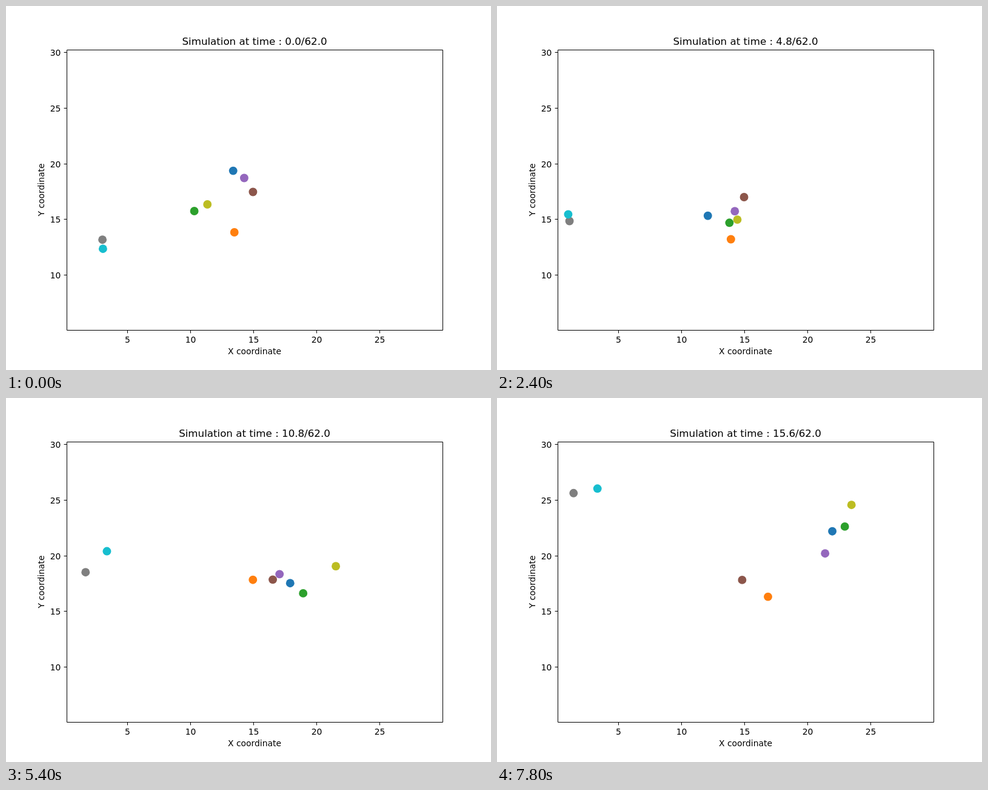
These frames come from a looping animation (800x600 px, 8000 ms). An HTML page:

```html
<!DOCTYPE html>
<html lang="en">
<head>
<meta charset="utf-8">
<title>Simulation</title>
<style>
  html, body { margin: 0; width: 100%; height: 100%; overflow: hidden; background: #fff; }
  svg { display: block; width: 100vw; height: 100vh; }
  text { font: 13.89px "DejaVu Sans", sans-serif; text-anchor: middle; }
  .title { font-size: 16.67px; }
  .end { text-anchor: end; }
  path { fill: none; stroke: #000; }
</style>
</head>
<body>
<svg id="stage" viewBox="0 0 800 600">
  <g id="dots"></g>
  <path d="M100.5 72.5H720.5V534.5H100.5Z"/>
  <g id="axes"></g>
  <text x="410" y="574">X coordinate</text>
  <text transform="translate(63 303) rotate(-90)">Y coordinate</text>
  <text id="title" class="title" x="410" y="64"></text>
</svg>
<script>
const LOOP = 8000, STEP = 200;

// Each walker drifts from one point to another while swaying:
// sway holds the x and y amplitudes of 1, 2 and 3 half waves.
const WALKERS = [
  { color: '#1f77b4', from: [374.7, 271.6], to: [553.1, 219.7], sway: [[-65, -28, -9], [99, 11, -7]] },
  { color: '#ff7f0e', from: [376.7, 373], to: [447, 327.6], sway: [[-18, 3, -2], [-12, 36, 7]] },
  { color: '#2ca02c', from: [310.6, 338], to: [573.7, 211.9], sway: [[-8, -3, 5], [80, -7, -5]] },
  { color: '#9467bd', from: [392.9, 283.5], to: [541.2, 256.2], sway: [[-51, -1, -14], [54, 20, 0]] },
  { color: '#8c564b', from: [407.4, 306.5], to: [404.4, 299.9], sway: [[20, -18, 6], [6, 7, -4]] },
  { color: '#7f7f7f', from: [159.1, 385.2], to: [126.3, 156.8], sway: [[-21, -13, 0], [62, -11, -5]] },
  { color: '#bcbd22', from: [332.2, 327], to: [584.7, 176.2], sway: [[10, -27, 15], [79, 9, -8]] },
  { color: '#17becf', from: [159.9, 400.2], to: [165.7, 149.3], sway: [[-23, -25, -8], [30, -3, -6]] }
];

const $ = id => document.getElementById(id);

function add(parent, tag, attrs, text = '') {
  const el = document.createElementNS('http://www.w3.org/2000/svg', tag);
  for (const k in attrs) el.setAttribute(k, attrs[k]);
  el.textContent = text;
  return parent.appendChild(el);
}

function buildAxes() {
  const axes = $('axes');
  for (let i = 0; i < 5; i++) {
    const x = 200.5 + 104 * i, row = Math.round(76.3 + 91.7 * i);
    add(axes, 'path', { d: `M${x} 535v4.4M100 ${row + 0.5}h-4.4` });
    add(axes, 'text', { x, y: 555 }, 5 + 5 * i);
    add(axes, 'text', { x: 90.3, y: row + 6, class: 'end' }, 30 - 5 * i);
  }
}

// Coordinate c (0 = x, 1 = y) of a walker at progress u from 0 to 1
function position(walker, c, u) {
  const drift = walker.from[c] + (walker.to[c] - walker.from[c]) * u;
  return walker.sway[c].reduce((sum, a, k) => sum + a * Math.sin((k + 1) * Math.PI * u), drift);
}

function render(ms) {
  const t = Math.floor((ms % LOOP) / STEP) * STEP;
  const u = t / (LOOP - STEP);
  $('title').textContent = `Simulation at time : ${(t / 500).toFixed(1)}/62.0`;
  for (const walker of WALKERS) {
    walker.el.setAttribute('cx', position(walker, 0, u));
    walker.el.setAttribute('cy', position(walker, 1, u));
  }
}

buildAxes();
for (const walker of WALKERS) {
  walker.el = add($('dots'), 'circle', { r: 6.95, fill: walker.color });
}

const start = performance.now();
function tick() {
  render(performance.now() - start);
  requestAnimationFrame(tick);
}
render(0);
requestAnimationFrame(tick);
</script>
</body>
</html>
```
